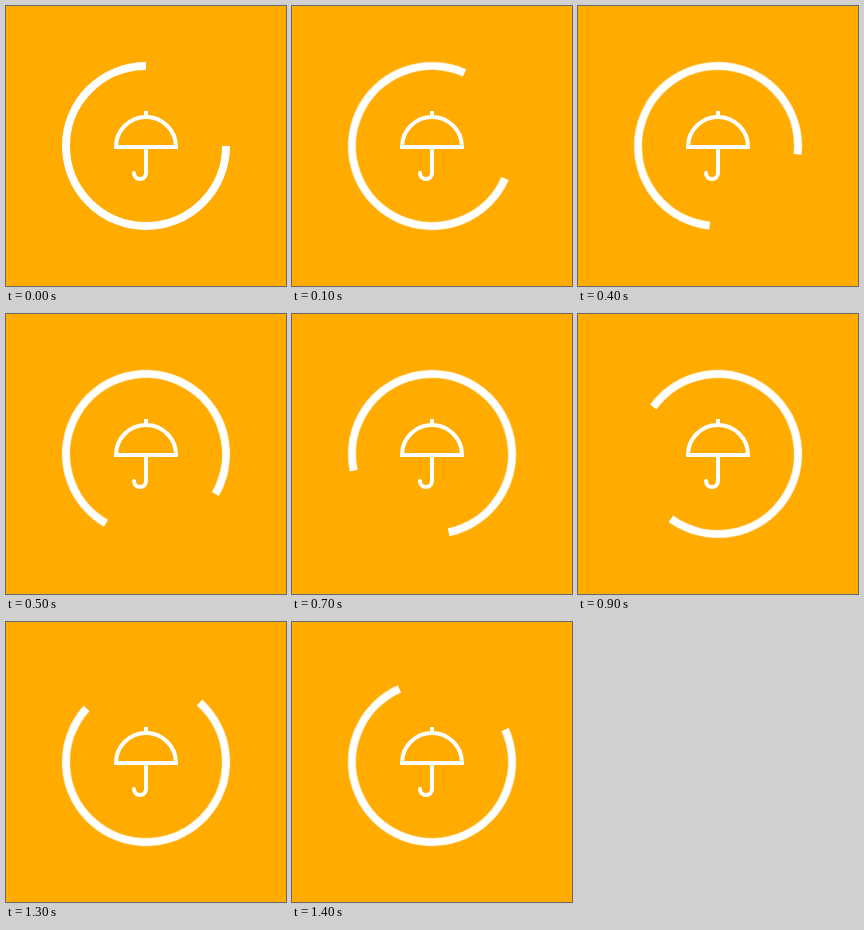
An HTML page for the animation above (1.5 s loop, 280 px wide and 280 px high).

```html
<!DOCTYPE html>
<html lang="en">
<head>
<meta charset="utf-8">
<title>Umbrella loader</title>
<style>
  html, body {
    margin: 0;
    width: 100%;
    height: 100%;
    overflow: hidden;
    background: #ffab00;
  }
  svg {
    display: block;
    width: 100vw;
    height: 100vh;
    fill: none;
    stroke: #fff;
  }
  .ring {
    stroke-width: 8;
    transform-origin: 140px 140px;
    animation: spin 1500ms steps(15, end) infinite;
  }
  .umbrella { stroke-width: 4; }
  .handle { stroke-linecap: round; }
  @keyframes spin {
    from { transform: rotate(0deg); }
    to { transform: rotate(360deg); }
  }
</style>
</head>
<body>
<svg viewBox="0 0 280 280">
  <path class="ring" d="M220 140A80 80 0 1 1 140 60"/>
  <g class="umbrella">
    <path d="M140 105V111"/>
    <path d="M110 141A30 30 0 0 1 170 141Z"/>
    <path class="handle" d="M140 141V167A6 6 0 0 1 128 167"/>
  </g>
</svg>
</body>
</html>
```
